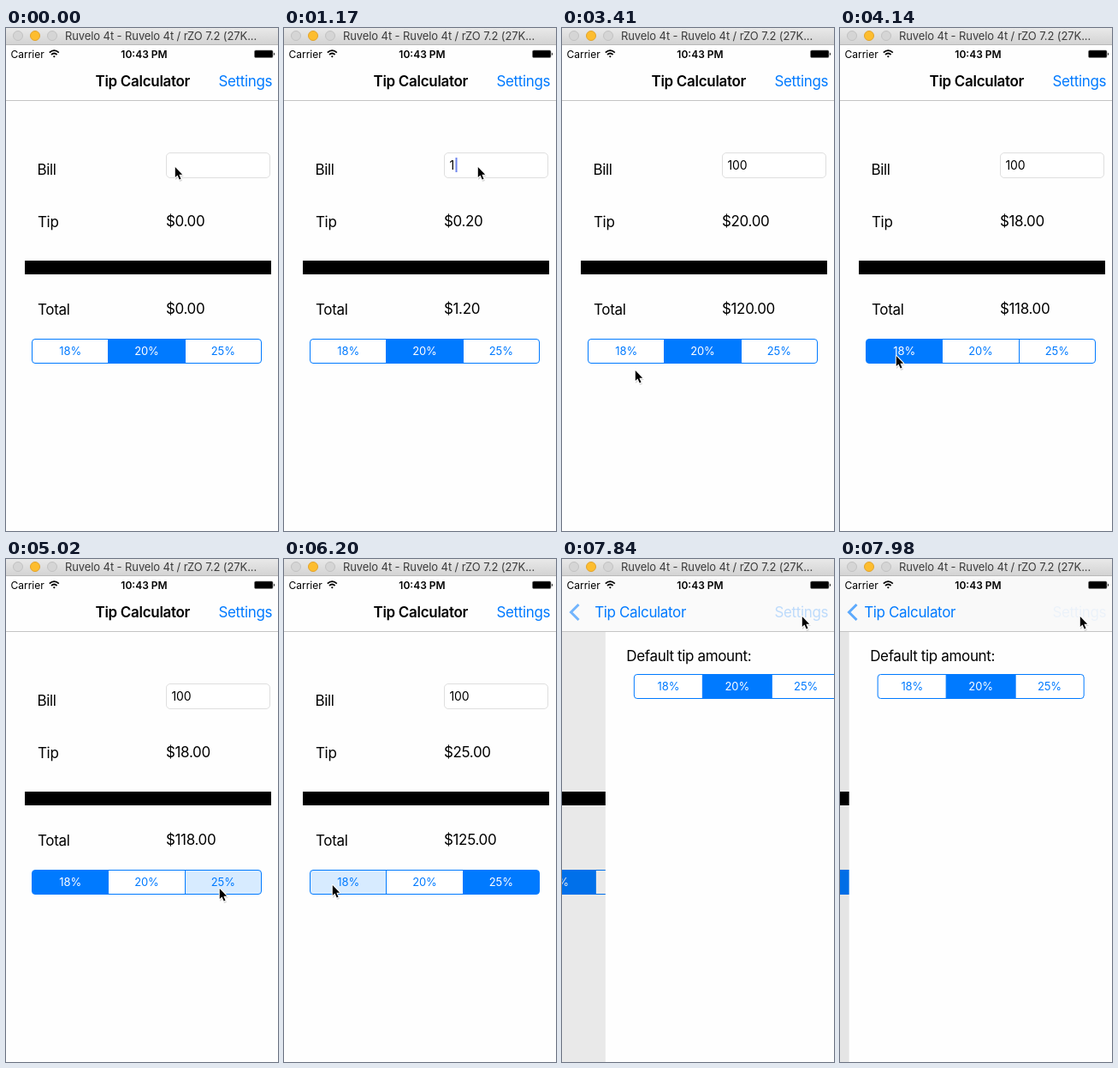
Animation of 318x586 px, one loop 8000 ms. Source, as an HTML page:

```html
<!DOCTYPE html>
<html lang="en">
<head>
<meta charset="utf-8">
<title>Tip Calculator</title>
<style>
  html, body { margin: 0; width: 100%; height: 100%; overflow: hidden; background: #fefefe; }
  svg { display: block; width: 100%; height: 100%; }
  text { font-family: Inter, "Liberation Sans", sans-serif; font-size: 17px; letter-spacing: -.35px; white-space: pre; }
  .blue { fill: #007aff; }
  .bold { font-weight: 600; letter-spacing: -.3px; }
  .small { font-size: 13px; letter-spacing: -.1px; }
  .field { font-size: 14px; letter-spacing: -.2px; }
  .status { font-size: 12px; letter-spacing: 0; }
  .line { fill: none; stroke: #007aff; }
</style>
</head>
<body>
<svg viewBox="0 0 318 586" xmlns="http://www.w3.org/2000/svg">
  <defs>
    <linearGradient id="chrome" x2="0" y2="1">
      <stop offset="0" stop-color="#e9e9e9"/>
      <stop offset="1" stop-color="#d2d2d2"/>
    </linearGradient>
  </defs>

  <g id="main">
    <rect width="318" height="586" fill="#fefefe"/>
    <text x="36.5" y="171">Bill</text>
    <text x="37" y="231.5">Tip</text>
    <text x="37" y="333.5">Total</text>
    <rect x="187.5" y="145.5" width="121" height="29" rx="4.5" fill="#fff" stroke="#dfdfdf"/>
    <text id="bill" class="field" x="193.5" y="165"></text>
    <rect id="caret" y="151" width="2" height="17" fill="#6f86ee"/>
    <text id="tip" x="187" y="231"></text>
    <text id="total" x="187" y="333"></text>
    <rect x="22" y="271" width="288" height="16"/>
    <g id="rates"></g>
  </g>
  <rect id="dim" width="318" height="586"/>

  <g id="prefs">
    <rect width="318" height="586" fill="#fefefe"/>
    <text x="24.5" y="119">Default tip amount:</text>
    <g id="defaults"></g>
  </g>

  <rect y="20" width="318" height="64" fill="#fefefe"/>
  <rect id="shade" y="20" width="318" height="64"/>
  <rect y="84" width="318" height="1" fill="#c4c4c4"/>
  <text id="title" class="bold" y="68">Tip Calculator</text>
  <text id="back" class="blue" y="68">Tip Calculator</text>
  <path id="chevron" class="line" d="M19.5 53L10.5 62L19.5 71" stroke-width="3"/>
  <text id="settings" class="blue" x="248.5" y="68">Settings</text>

  <text class="status" x="5.5" y="34.5">Carrier</text>
  <g fill="none" stroke="#000" stroke-width="1.7">
    <path d="M50.8 28.7Q56.3 23.7 61.8 28.7M53 31Q56.3 28 59.6 31"/>
    <path d="M56.3 34.5L54.9 32.9Q56.3 31.7 57.7 32.9Z" fill="#000" stroke="none"/>
  </g>
  <text class="status bold" x="161.5" y="34.5" text-anchor="middle">10:43 PM</text>
  <rect x="290.5" y="26" width="21.5" height="8.5" rx="1.5" stroke="#777" stroke-width=".6"/>
  <path d="M313 28.5Q315 30.3 313 32Z"/>

  <rect width="318" height="20" fill="url(#chrome)"/>
  <rect y="19" width="318" height="1" fill="#b9b9b9"/>
  <g fill="#d5d5d5" stroke="#c2c2c2">
    <circle cx="14" cy="9" r="5.5"/>
    <circle cx="34" cy="9" r="5.5" fill="#fdbd2f" stroke="#e2a32b"/>
    <circle cx="54" cy="9" r="5.5"/>
  </g>
  <text class="small" x="69" y="14" fill="#3c3c3c">Ruvelo 4t - Ruvelo 4t / rZO 7.2 (27K...</text>

  <g id="cursor" stroke-linejoin="round">
    <path d="M1 2V16L4 13.5L6 18L9 17L7 12H11Z" opacity=".15"/>
    <path d="M.8 1V13L3.5 10.5L5.7 15.5L7.5 14.7L5.4 9.8H9.2Z" stroke="#fff" stroke-width="2" paint-order="stroke"/>
  </g>
</svg>
<script>
const LOOP = 8000, WIDTH = 318;
const STEP = 7980 / 54; // the screen refreshes at this even pace

// Pointer moves, in steps: begin, end, x, y
const moves = [
  [1, 4, 226, 161],   // rest in the bill field
  [14, 15, 190, 178],
  [15, 19, 128, 480], // empty area
  [20, 23, 85, 398],
  [23, 25, 65, 381],  // 18%
  [28, 33, 249, 383], // 25%
  [36, 40, 56, 379],  // 18%
  [43, 47, 208, 176],
  [47, 49, 280, 66]   // Settings
];

// Chosen segment and the step of its release
const taps = [
  { index: 1, at: 0 }, { index: 0, at: 26 }, { index: 2, at: 35 }, { index: 0, at: 43 }
];
const rates = [.18, .2, .25];

const $ = id => document.getElementById(id);
const set = (id, attrs) => {
  for (const k in attrs) $(id).setAttribute(k, attrs[k]);
};
const clamp = (v, lo = 0, hi = 1) => Math.min(hi, Math.max(lo, v));
const smooth = k => k * k * (3 - 2 * k);
const money = v => "$" + v.toFixed(2);

function pointer(n) {
  let x = 197, y = 161;
  for (const [from, to, tx, ty] of moves) {
    const k = smooth(clamp((n - from) / (to - from)));
    x += (tx - x) * k;
    y += (ty - y) * k;
  }
  return [Math.round(x), Math.round(y)];
}

// Critically damped spring for the page push
function push(n) {
  const u = Math.max(0, n - 51.3) * 1.935;
  return 1 - (1 + u) * Math.exp(-u);
}

// Segmented control; returns its update function
function segments(id, x, y, w) {
  const edge = i => Math.round(x + w / 3 * i - .5) + .5;
  const frame = `x="${x}" y="${y}" width="${w}" height="28" rx="3.5"`;
  const cells = rates.map((rate, i) =>
    `<rect x="${edge(i)}" y="${y}" width="${edge(i + 1) - edge(i)}" height="28" clip-path="url(#${id}Clip)"/>
     <text class="small" x="${x + w / 3 * (i + .5)}" y="${y + 18.7}" text-anchor="middle">${rate * 100}%</text>`);
  $(id).innerHTML = `<clipPath id="${id}Clip"><rect ${frame}/></clipPath>` + cells.join("") +
    `<path class="line" d="M${edge(1)} ${y}v28M${edge(2)} ${y}v28"/><rect class="line" ${frame}/>`;
  const texts = $(id).querySelectorAll("text");
  return (chosen, pressed) => texts.forEach((el, i) => {
    const on = i === chosen;
    el.setAttribute("fill", on ? "#fff" : "#007aff");
    el.previousElementSibling.setAttribute("fill", on ? "#007aff" : i === pressed ? "#d7ebff" : "#fff");
  });
}

const showRates = segments("rates", 30.5, 362.5, 268);
segments("defaults", 33.5, 134.5, 241)(1);

function draw(time) {
  const n = Math.floor((time + 20) / STEP);
  const typed = clamp(Math.floor((n - 5) / 2), 0, 3); // a key every two steps
  const bill = typed ? 10 ** (typed - 1) : 0;
  const chosen = taps.filter(t => t.at <= n).pop().index;
  const pressed = taps.find(t => t.at === n + 1);
  const tip = bill * rates[chosen];

  $("bill").textContent = bill || "";
  $("tip").textContent = money(tip);
  $("total").textContent = money(bill + tip);
  showRates(chosen, pressed && pressed.index);
  set("caret", { x: typed ? 192.5 + typed * 8 : 194, opacity: n >= 4 && n < 21 ? 1 : 0 });

  const p = push(n), titleX = 104.5 - 79 * p;
  set("main", { transform: `translate(${-WIDTH * .3 * p})` });
  set("prefs", { transform: `translate(${WIDTH * (1 - p)})` });
  set("dim", { opacity: .1 * p });
  set("shade", { opacity: .02 * p });
  set("title", { x: titleX, opacity: clamp(1 - p * 1.5) });
  set("back", { x: titleX, opacity: clamp(p * 1.5) });
  set("chevron", { opacity: .65 * p });
  set("settings", { opacity: p ? clamp(1.5 * (1 - p)) : n >= 50 ? .3 : 1 });
  set("cursor", { transform: `translate(${pointer(n)})` });
}

const start = performance.now();
function tick() {
  draw((performance.now() - start) % LOOP);
  requestAnimationFrame(tick);
}
tick();
</script>
</body>
</html>
```
